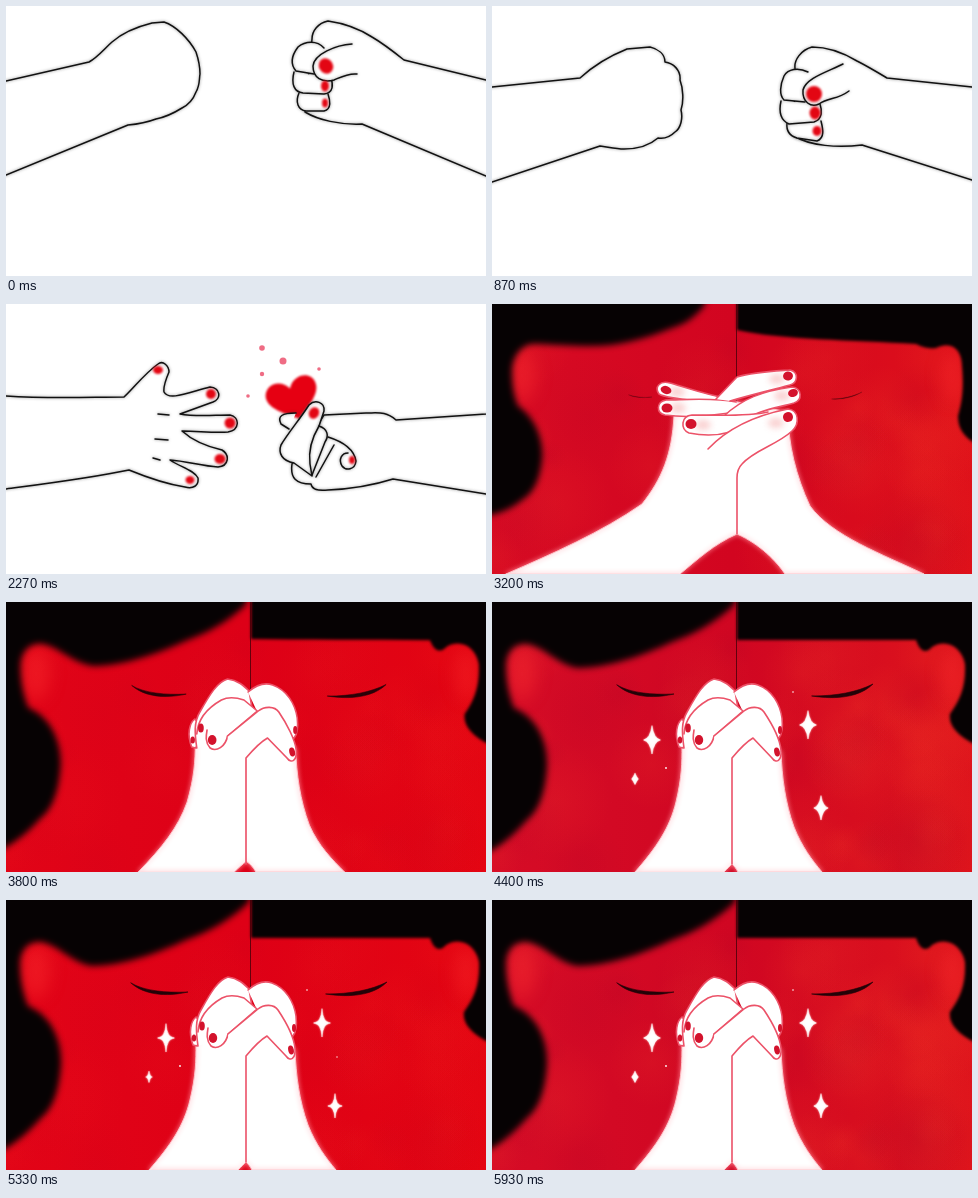
Recreate the animation shown at these times as an HTML page with a canvas. Size 480x270 px, loop 5.99 s.

```html
<!DOCTYPE html>
<html lang="en">
<head>
<meta charset="utf-8">
<title>Hands</title>
<style>
html, body { margin: 0; width: 100%; height: 100%; overflow: hidden; background: #fff; }
canvas { display: block; width: 480px; height: 270px; }
</style>
</head>
<body>
<canvas id="stage" width="480" height="270"></canvas>
<script>
const ctx = document.getElementById('stage').getContext('2d');
const LOOP = 5990, STEP = 200 / 3, RED_START = 2670;
const clamp = v => Math.max(0, Math.min(1, v));
const lerp = (a, b, k) => a + (b - a) * k;
const ease = k => k * k * (3 - 2 * k);

// Blend two path strings that share the same commands.
function mix(a, b, k) {
  const to = b.match(/-?[\d.]+/g);
  let i = 0;
  return a.replace(/-?[\d.]+/g, v => lerp(+v, +to[i++], k).toFixed(2));
}

function shape(d, fill, stroke, width) {
  const p = new Path2D(d);
  if (fill) { ctx.fillStyle = fill; ctx.fill(p); }
  if (stroke) { ctx.strokeStyle = stroke; ctx.lineWidth = width; ctx.stroke(p); }
}

function layer(draw) {
  ctx.save();
  draw();
  ctx.restore();
}

function oval(x, y, rx, ry, color, blur = 0, angle = 0) {
  layer(() => {
    if (blur) ctx.filter = `blur(${blur}px)`;
    ctx.fillStyle = color;
    ctx.beginPath();
    ctx.ellipse(x, y, rx, ry, angle, 0, 7);
    ctx.fill();
  });
}

// ---------- white scene ----------

const ink = (d, fill = '#fff') => layer(() => {
  shape(d, fill);
  ctx.shadowColor = 'rgba(60,60,60,.6)';
  ctx.shadowBlur = 3;
  shape(d, null, '#111', 1.5);
});
const nail = (x, y, rx, ry, a) => oval(x, y, rx, ry, '#e30613', 0.9, a);

const hands = {
  up: {
    left() {
      ink('M-60 89 L0 75 L83 56 C92 51 98 43 106 36 C115 28 130 21 146 17 L158 16 C170 20 183 33 190 46 C192 52 194 60 194 68 C193 74 194 79 190 86 C187 94 182 99 176 102 C168 107 160 111 150 113 C142 116 133 118 122 119 L0 169 L-60 194');
    },
    right() {
      ink('M540 88 L480 74 L398 54 C388 46 378 38 366 31 C352 22 336 17 322 15 C312 17 306 25 306 33 L299 106 C312 114 334 119 356 118 L480 170 L540 195');
      ink('M293 87 C289 96 292 104 300 105 L318 105 C326 103 324 94 322 88');
      ink('M288 66 C285 78 288 86 297 87 L318 88 C328 87 327 78 325 72');
      ink('M318 42 C311 34 299 35 292 41 C286 49 284 58 290 65 L308 68');
      ink('M346 38 C330 39 308 48 307 60 C307 72 316 77 328 74 C335 71 342 67 351 68');
      nail(320, 60, 7, 8, -0.5);
      nail(319, 80, 4, 5.5);
      nail(319, 97, 3, 4.5);
    }
  },
  down: {
    left() {
      ink('M-60 87 L0 81 L88 72 C100 61 115 51 135 43 L158 41 C166 43 173 48 173 56 C181 57 189 64 188 74 C191 82 192 95 189 104 C191 112 189 122 183 126 C178 131 172 133 166 132 C158 139 146 143 132 143 C124 143 116 141 108 140 L0 176 L-60 196');
    },
    right() {
      ink('M540 88 L480 81 L395 72 C385 66 375 60 365 55 C350 46 335 41 320 41 C309 44 302 54 303 62 L302 130 C318 140 346 142 370 139 L480 174 L540 193');
      ink('M295 117 C294 126 298 130 305 132 L325 135 C333 132 331 123 329 115');
      ink('M289 95 C287 104 288 114 297 118 L322 116 C331 113 330 104 328 98');
      ink('M316 66 C306 61 296 63 292 70 C288 79 287 89 292 94 L313 96');
      ink('M351 58 C335 66 314 72 311 84 C310 96 319 102 327 98 C337 91 345 94 357 85');
      nail(322, 88, 8, 8);
      nail(323, 107, 5.5, 6.5);
      nail(325, 125, 4.5, 5);
    }
  },
  open: {
    left() {
      ink('M-60 91 L0 92 C45 95 85 93 118 93 C126 86 138 70 152 60 C157 56 163 62 163 68 C160 75 157 82 158 88 C163 97 181 89 204 83 C214 84 216 94 207 98 L174 110 C190 113 208 111 224 111 C234 113 234 126 222 128 C207 129 192 127 176 127 C187 137 203 143 216 146 C224 151 223 162 212 163 C196 162 180 157 164 156 C174 163 188 166 192 174 C193 182 187 185 179 183 C160 180 140 173 123 166 C85 174 45 179 0 185 L-60 192');
      ink('M152 110 L163 111 M149 135 L162 136 M147 154 L154 156', null);
      nail(152, 66, 5, 4);
      nail(205, 90, 5, 5);
      nail(224, 119, 5.5, 5.5);
      nail(214, 155, 5.5, 5);
      nail(184, 176, 4.5, 4);
    },
    right() {
      ink('M540 104 L480 110 L390 116 C380 107 372 109 360 109 L318 111 L286 160 C284 174 290 180 305 180 C306 186 312 187 322 186 C345 185 368 181 387 175 L480 190 L540 199');
      ink('M290 109 C276 109 271 112 275 120 L283 125');
      ink('M303 101 C309 95 319 98 318 107 L313 122 C307 132 302 145 304 160 L306 172 L288 159 C276 157 272 149 275 141 C282 129 294 115 303 101');
      ink('M313 122 C322 125 323 132 319 138 L306 171', null);
      ink('M322 133 C338 138 348 145 350 157 C349 166 340 167 336 162 C332 155 336 149 342 149 M328 141 L310 173', null);
      nail(308, 109, 5, 6, 0.5);
      nail(346, 156, 3, 4);
    }
  }
};

// time, hand shape, arm angle in degrees
const beats = [
  [0, 'up', 0], [400, 'down', 0], [530, 'down', 7], [670, 'down', 0], [730, 'up', 0],
  [870, 'down', 0], [1000, 'down', 7], [1130, 'down', 4], [1270, 'up', 0],
  [1400, 'up', -8], [1530, 'up', -12], [1670, 'up', -5], [1800, 'open', -3],
  [1930, 'open', 2], [2070, 'open', 1], [2130, 'open', 0.5], [2200, 'open', 0],
  [2270, 'open', 0], [2400, 'open', 0], [2530, 'open', 0.4]
];

function arm(x, angle, draw) {
  layer(() => {
    ctx.translate(x, 125);
    ctx.rotate(angle * Math.PI / 180);
    ctx.translate(-x, -125);
    draw();
  });
}

function heart(t) {
  const size = lerp(0.4, 1, clamp((t - 2070) / 180));
  layer(() => {
    ctx.translate(287, 94);
    ctx.rotate(-0.3);
    ctx.scale(size, size);
    ctx.filter = 'blur(1px)';
    shape('M0 22 C-10 14 -27 4 -26 -8 C-24 -21 -7 -23 0 -10 C7 -23 25 -21 26 -8 C27 4 10 14 0 22 Z', '#e60012');
  });
  const alpha = 0.6 * clamp((2640 - t) / 370);
  const rise = (2270 - t) * 0.02;
  for (const [x, y, r] of [[256, 44, 2.8], [277, 57, 3.5], [256, 70, 2.2], [242, 92, 1.8], [313, 65, 1.8]])
    oval(x, y + rise, r, r, `rgba(228,10,50,${alpha})`, 0.5);
}

function whiteScene(t) {
  const [at, name, angle] = beats.findLast(b => b[0] <= t);
  arm(-47, angle, hands[name].left);
  if (at >= 2070) heart(at);
  arm(527, -angle, hands[name].right);
}

// ---------- red scene ----------

const hairLeft = [
  'M-20 -20 L220 -20 L212 2 C204 12 194 20 180 24 C150 36 125 42 100 42 C70 42 55 40 40 40 C27 42 20 55 20 68 C20 82 22 92 26 102 C42 112 52 135 50 155 C48 178 40 190 30 196 C15 208 5 210 -20 215 Z',
  'M-20 -20 L244 -20 L243 2 C225 20 200 33 180 40 C150 54 115 66 85 66 C65 62 52 45 35 42 C22 41 14 50 14 65 C14 82 18 96 22 106 C45 115 56 140 55 165 C53 195 45 210 35 218 C20 235 5 248 -20 258 Z'
];
const hairRight = [
  'M500 -20 L245 -20 L245 26 C290 36 360 36 424 40 C432 44 438 45 444 44 C460 36 470 46 470 62 C472 85 470 98 466 112 C466 125 472 138 500 146 Z',
  'M500 -20 L245 -20 L245 38 C300 38 360 38 424 38 C428 50 434 52 440 45 C455 36 470 46 473 62 C474 85 468 98 458 112 C456 125 468 138 500 150 Z'
];
const eyes = [
  'M137 91 C143 93 152 94 160 93 C154 94 143 94 137 91 Z M340 95 C350 95 362 92 370 88 C362 93 350 96 340 95 Z',
  'M125 83 C138 91 160 93 182 92 C160 97 138 95 125 83 Z M320 94 C345 94 365 90 381 82 C368 95 345 98 320 94 Z'
];
const arms = [
  'M14 270 C60 250 110 228 150 200 C170 175 180 150 182 112 L230 95 L296 108 C296 140 304 172 318 202 C340 232 390 250 432 270 L293 270 C285 258 268 240 245 230 C222 240 205 256 188 270 Z',
  'M143 270 C165 245 178 225 184 200 C190 175 190 160 190 145 L222 110 L289 150 C290 175 293 200 302 225 C310 245 320 258 330 270 L246 270 C244 266 242 264 240 262 C238 264 236 266 232 270 Z'
];
const PINK = '#ec5268', NAIL = '#d3122c';
const finger = d => shape(d, '#fff', PINK, 1.6);
const tip = (x, y, rx, ry, a) => oval(x, y, rx, ry, NAIL, 0.4, a);
const blush = (x, y) => oval(x, y, 8, 5, 'rgba(240,120,120,.35)', 3);

function laced() {
  finger('M242 96 C215 91 195 84 178 79 C168 76 162 83 167 90 C175 95 200 96 218 98');
  finger('M244 98 C220 93 190 96 174 96 C164 98 164 109 173 111 C195 114 215 112 245 108');
  finger('M224 95 L245 73 C262 68 285 67 298 66 C307 68 306 79 298 81 C280 86 262 90 238 97');
  finger('M232 112 C250 95 270 87 300 83 C310 84 311 96 302 99 C285 104 265 106 250 118');
  finger('M276 108 C255 113 215 111 200 111 C189 112 188 125 197 129 C212 132 228 131 238 128');
  finger('M216 145 C235 125 260 112 296 105 C307 106 308 120 300 127 C285 141 262 146 250 160 C246 164 245 168 245 174 L245 230');
  for (const [x, y] of [[185, 88], [186, 104], [211, 121], [285, 75], [290, 92], [284, 119]]) blush(x, y);
  tip(174, 86, 5.5, 4, 0.3);
  tip(175, 104, 5.5, 4.5);
  tip(199, 120, 5.5, 5);
  tip(296, 72, 5, 4.5, -0.2);
  tip(301, 89, 5, 4, -0.3);
  tip(296, 113, 5, 5, -0.4);
}

function clasped() {
  finger('M187 145 C182 132 185 121 190 117 C197 122 196 138 191 146 Z');
  finger('M192 146 C190 132 189 120 195 110 C205 92 212 80 222 77 C232 78 238 84 243 89 L250 130');
  finger('M242 90 C250 83 258 80 266 83 C280 88 288 102 290 116 C291 125 290 132 287 136 L260 130');
  finger('M192 132 C193 116 204 105 216 98 C224 94 232 96 238 98 L251 109 L222 134 C220 145 211 150 205 146 C200 140 201 134 202 128');
  finger('M222 134 L252 109 C258 104 268 104 272 110 C280 122 288 138 289 148 C290 159 284 162 280 156 L261 136 C254 140 245 150 240 156 L240 262');
  tip(188, 138, 2.2, 3.5);
  tip(196, 126, 2.8, 4.5);
  tip(207, 138, 4.2, 5);
  tip(288, 128, 2, 4);
  tip(285, 150, 2.8, 4.5, -0.2);
}

function squeeze(alpha, sx, draw) {
  if (alpha <= 0) return;
  layer(() => {
    ctx.globalAlpha = alpha;
    ctx.translate(240, 0);
    ctx.scale(sx, 1);
    ctx.translate(-240, 0);
    draw();
  });
}

let seed = 7;
const rnd = () => (seed = seed * 16807 % 2147483647) / 2147483647;
const blots = Array.from({ length: 46 }, () => ({
  x: rnd() * 480, y: 40 + rnd() * 230, r: 18 + rnd() * 45, warm: rnd()
}));

function paper(rough) {
  const g = ctx.createLinearGradient(0, 0, 480, 0);
  g.addColorStop(0, `rgb(${lerp(226, 214, rough)},${lerp(4, 12, rough)},${lerp(22, 38, rough)})`);
  g.addColorStop(0.5, `rgb(${lerp(222, 208, rough)},${lerp(0, 6, rough)},${lerp(22, 34, rough)})`);
  g.addColorStop(1, `rgb(${lerp(228, 222, rough)},${lerp(4, 20, rough)},${lerp(18, 28, rough)})`);
  ctx.fillStyle = g;
  ctx.fillRect(0, 0, 480, 270);
  const power = lerp(0.04, 0.12, rough);
  for (const b of blots) {
    const warm = b.warm < 0.3 + b.x / 900;
    const rgb = warm ? '250,70,40' : '165,0,40';
    const spot = ctx.createRadialGradient(b.x, b.y, 0, b.x, b.y, b.r);
    spot.addColorStop(0, `rgba(${rgb},${power})`);
    spot.addColorStop(1, `rgba(${rgb},0)`);
    ctx.fillStyle = spot;
    ctx.fillRect(b.x - b.r, b.y - b.r, b.r * 2, b.r * 2);
  }
  oval(30, 72, 14, 26, 'rgba(255,50,50,.4)', 8);
  oval(460, 72, 11, 26, 'rgba(255,50,50,.35)', 8);
}

function sparkle(x, y, h, thick) {
  const w = h * 0.6, c = thick;
  shape(`M${x} ${y - h} Q${x + c} ${y - c} ${x + w} ${y} Q${x + c} ${y + c} ${x} ${y + h} Q${x - c} ${y + c} ${x - w} ${y} Q${x - c} ${y - c} ${x} ${y - h} Z`, '#fff', '#fff', 0.5);
}

function sparkles(t, rough) {
  const grow = ease(clamp((t - 3900) / 400));
  if (!grow) return;
  layer(() => {
    ctx.shadowColor = 'rgba(255,190,190,.8)';
    ctx.shadowBlur = 2;
    const thick = lerp(0.7, 1.8, rough) * grow;
    sparkle(160, 138, 14 * grow, thick);
    sparkle(316, 123, 14 * grow, thick);
    sparkle(329, 206, 12 * grow, thick);
    sparkle(143, 177, 5.5 * grow, thick);
  });
  oval(301, 90, 0.8, 0.8, '#fff');
  oval(174, 166, 0.9, 0.9, '#fff');
  if (rough < 0.5) oval(331, 157, 0.8, 0.8, '#fcc');
}

function redScene(time) {
  const t = Math.floor((time + 4) / STEP) * STEP;
  const enter = ease(clamp((t - RED_START) / 530));
  const bow = ease(clamp((t - 3200) / 730));
  const k = bow - 0.4 * (1 - enter);
  const rough = 0.5 + 0.5 * Math.cos((t - 4400) / 1530 * 8 * Math.PI);

  paper(rough);
  layer(() => {
    ctx.filter = 'blur(3px)';
    shape(mix(...hairLeft, k), '#060203');
    ctx.filter = 'blur(1.5px)';
    shape(mix(...hairRight, k), '#060203');
  });
  shape('M244.5 0 L244.5 100', null, 'rgba(60,0,8,.75)', 1);
  layer(() => {
    ctx.globalAlpha = enter * lerp(0.6, 1, bow);
    shape(mix(...eyes, bow), '#240308', '#240308', lerp(0.3, 0.6, bow));
  });

  layer(() => {
    ctx.translate(0, 60 * (1 - enter));
    layer(() => {
      ctx.shadowColor = '#ff8090';
      ctx.shadowBlur = 5;
      shape(mix(...arms, bow), '#fff', '#ffc4ca', 1);
    });
    const swap = clamp((bow - 0.35) / 0.3);
    squeeze(1 - swap, lerp(1, 0.72, bow), laced);
    squeeze(swap, lerp(1.3, 1, bow), clasped);
  });
  sparkles(t, rough);

  const haze = 0.6 * clamp(1 - (t - RED_START) / 200);
  if (haze) {
    ctx.fillStyle = `rgba(255,255,255,${haze})`;
    ctx.fillRect(0, 0, 480, 270);
  }
}

function frame() {
  const t = performance.now() % LOOP;
  ctx.lineCap = ctx.lineJoin = 'round';
  ctx.fillStyle = '#fff';
  ctx.fillRect(0, 0, 480, 270);
  if (t < RED_START) whiteScene(t);
  else redScene(t);
  requestAnimationFrame(frame);
}
frame();
</script>
</body>
</html>
```
